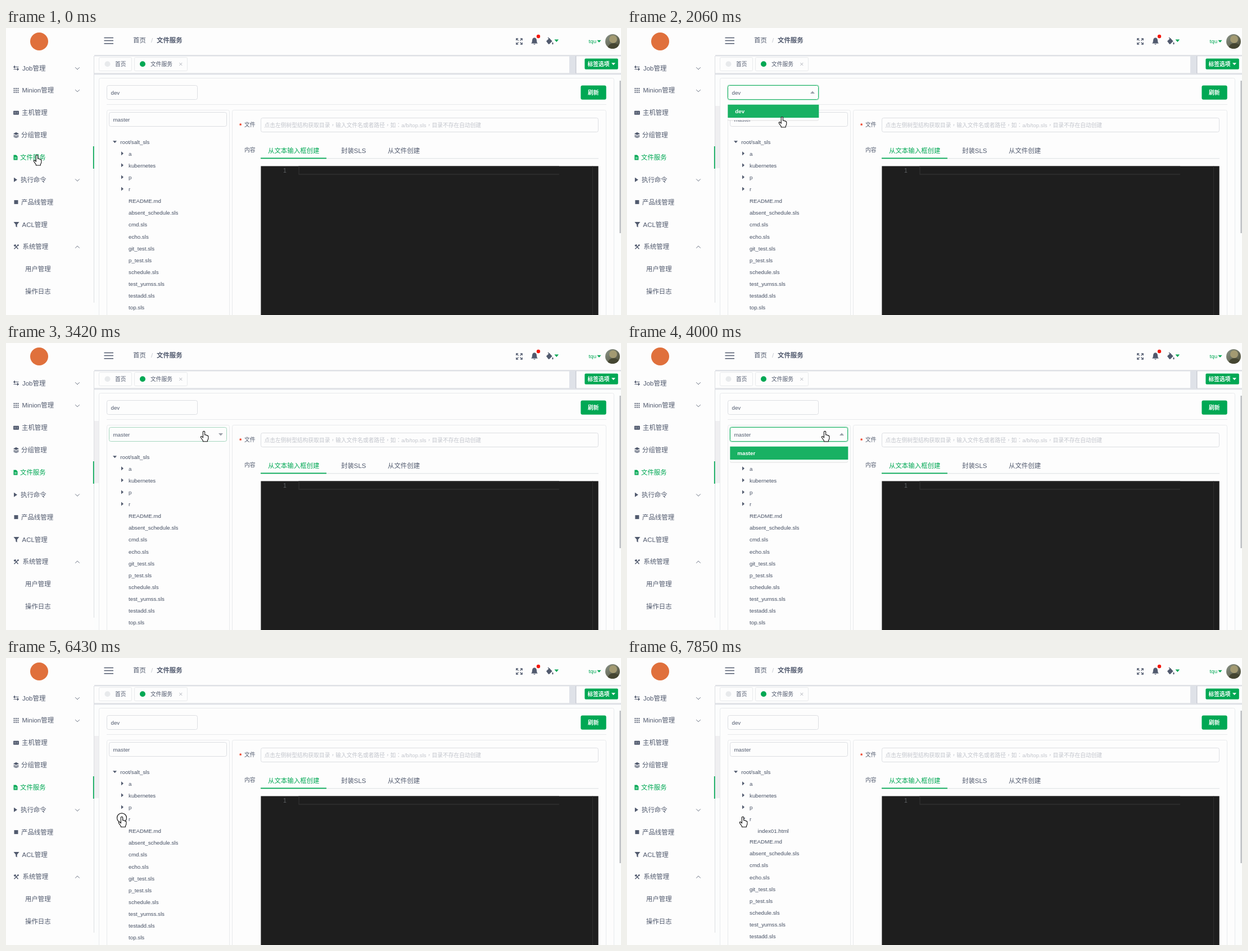
These frames come from a looping animation (1094 px wide and 512 px high, 8 s). An HTML page:

```html
<!DOCTYPE html>
<html lang="zh">
<head>
<meta charset="utf-8">
<title>文件服务</title>
<style>
html, body { margin: 0; width: 100%; height: 100%; overflow: hidden; background: #fff; }
svg { display: block; width: 1094px; height: 512px; }
text { font-family: "Liberation Sans", "Noto Sans CJK SC", "Noto Sans CJK", sans-serif; white-space: pre; }
.hint { font-family: "Liberation Sans", "Noto Sans CJK TC", "Noto Sans CJK", sans-serif; }
</style>
</head>
<body>
<svg id="stage" viewBox="0 0 1094 512" xmlns="http://www.w3.org/2000/svg"></svg>
<script>
const LOOP = 8000;
const GREEN = '#00a854', INK = '#515a6e', LINE = '#dcdee2', PALE = '#e8eaec', PAPER = '#fdfdfd';
const SMALL = 9.75, MEDIUM = 11.45;
const ROW = 21.13;

// --- drawing helpers -------------------------------------------------
const attrs = o => Object.entries(o).map(([k, v]) => ` ${k}="${v}"`).join('');
const tag = (name, o, inner = '') => `<${name}${attrs(o)}>${inner}</${name}>`;
const rect = (x, y, x2, y2, fill, o = {}) =>
  tag('rect', { x, y, width: x2 - x, height: y2 - y, fill, ...o });
const frame = (x, y, x2, y2, stroke = LINE, o = {}) =>
  rect(x + .5, y + .5, x2 - .5, y2 - .5, PAPER, { stroke, rx: 3, ...o });
const path = (d, fill = INK, o = {}) => tag('path', { d, fill, ...o });
const stroke = (d, color = INK, width = 1, o = {}) =>
  path(d, 'none', { stroke: color, 'stroke-width': width, ...o });
const circle = (cx, cy, r, fill, o = {}) => tag('circle', { cx, cy, r, fill, ...o });
// y is the middle of the line
const text = (x, y, s, size = SMALL, fill = INK, o = {}) =>
  tag('text', { x, y: y + size * .36, 'font-size': size, fill, ...o }, s);
const boldText = (x, y, s, size, fill) => text(x, y, s, size, fill, { 'font-weight': 700 });
const group = (id, inner = '', o = {}) => tag('g', { id, ...o }, inner);
const caretDown = (x, y, fill, r = 3.6) => path(`M${x - r} ${y - r / 2}h${2 * r}l${-r} ${r * 1.15}z`, fill);
const caretRight = (x, y) => path(`M${x - 2} ${y - 3.5}v7l4 -3.5z`);
const chevron = (x, y, up) => stroke(`M${x - 3.8} ${y + up * 1.8}l3.8 ${-up * 3.8}l3.8 ${up * 3.8}`, '#6b7383');

// --- sidebar ---------------------------------------------------------
const icons = [
  y => stroke(`M13.5 ${y - 2}h9M13.5 ${y + 2}h9`, INK, 1.2) +
       path(`M16 ${y - 5}v6l-3 -3zM20 ${y - 1}v6l3 -3z`),
  y => [-1, 0, 1].map(i => [-1, 0, 1].map(j =>
       rect(17 + i * 3.4, y - 1 + j * 3.4, 19 + i * 3.4, y + 1 + j * 3.4, INK)).join('')).join(''),
  y => rect(13, y - 3.5, 23, y + 3.5, INK, { rx: 1 }) +
       stroke(`M15 ${y - 1.5}v3M17.5 ${y - 1.5}v3M20.5 ${y - 1.5}v3`, '#c5c8ce', .8),
  y => path(`M18 ${y - 5}l5 2.5l-5 2.5l-5 -2.5z`) +
       stroke(`M13.5 ${y}l4.5 2.2l4.5 -2.2M13.5 ${y + 2.3}l4.5 2.2l4.5 -2.2`, INK, 1.2),
  y => path(`M13.5 ${y - 4.5}h4.5l2.5 2.5v6.5h-7z`, GREEN) +
       stroke(`M15 ${y}h4M15 ${y + 2}h4`, '#fff', .8),
  y => path(`M14 ${y - 4}v8l6 -4z`),
  y => rect(14.5, y - 3.5, 21.5, y + 3.5, INK),
  y => path(`M13.5 ${y - 4.5}h10l-3.8 4.8v4.7l-2.4 -1.5v-3.2z`),
  y => stroke(`M15.5 ${y - 3}l6 7M22 ${y - 3.5}l-7.5 7.5`, INK, 1.4) +
       path(`M13.5 ${y - 2.5}l3 -2l1.6 1.6l-3 2.6zM19.8 ${y - 3.6}l2.4 -.8l.8 2.4l-2 .8z`)
];
const menu = [
  ['Job管理', 29, -1], ['Minion管理', 28.5, -1], ['主机管理', 28], ['分组管理', 27], ['文件服务', 25],
  ['执行命令', 26, -1], ['产品线管理', 27], ['ACL管理', 28.5], ['系统管理', 29.5, 1],
  ['用户管理', 34], ['操作日志', 34]
];

function sidebar() {
  const rows = menu.map(([label, x, arrow], i) => {
    const y = 71.5 + i * 39.85;
    return (icons[i] ? icons[i](y) : '') +
      text(x, y, label, MEDIUM, i === 4 ? GREEN : INK) +
      (arrow ? chevron(127, y + .5, arrow) : '');
  }).join('');
  return rect(156, 50, 157, 490, LINE) + rect(154.9, 211, 156.6, 251, GREEN) +
    circle(59, 24, 16, '#e0703c') + rows;
}

// --- header and tab bar ------------------------------------------------
function header() {
  const corners = [[1, 1], [-1, 1], [1, -1], [-1, -1]].map(([a, b]) =>
    `M${913 - a * 5.2} ${24 - b * 1.8}v${-b * 3.4}h${a * 3.4}M${913 - a * 5} ${24 - b * 5}l${a * 3.6} ${b * 3.6}`).join('');
  return stroke('M174.5 17.5h16.5M174.5 22.5h16.5M174.5 27.7h16.5', INK, 1.6) +
    text(226, 22, '首页', MEDIUM) + text(258, 22, '/', MEDIUM, '#c5c8ce') +
    boldText(268, 22, '文件服务', MEDIUM, INK) +
    stroke(corners, INK, 1.3) +
    path('M934 27.5q2 -1.5 2 -5q0 -4.8 4 -5.3q4 .5 4 5.3q0 3.5 2 5zM938 28.5h4q-2 2.6 -4 0z') +
    circle(947, 15, 3.2, '#f5180c') +
    path('M961 23.5l5.5 -5.5l5.2 5.5l-5 5q-1 .8 -2 0zM972.5 25q2.4 3.6 0 4.4q-2.4 -.8 0 -4.4z') +
    stroke('M964 17l3 2.5', INK, 1.2) +
    caretDown(979.3, 22.5, GREEN, 3.8) +
    text(1036.5, 23.5, 'tqu', SMALL, GREEN) + caretDown(1055, 23.5, GREEN) +
    tag('g', { 'clip-path': 'url(#face)' },
      rect(1066, 11, 1092, 37, 'url(#photo)') +
      tag('ellipse', { cx: 1080, cy: 20, rx: 7, ry: 7, fill: '#a39a72' }) +
      tag('ellipse', { cx: 1081, cy: 35, rx: 10, ry: 8, fill: '#454632' }));
}

function tabBar() {
  return rect(157, 48, 1094, 50.5, '#dfe1e6') + rect(157, 80.3, 1094, 83.3, '#dfe1e6') +
    frame(165, 52, 224, 77, PALE, { rx: 2 }) + circle(180.5, 64.3, 5, PALE) + text(194, 64.5, '首页') +
    frame(228, 52, 323, 77, PALE, { rx: 2 }) + circle(243, 64.3, 5, GREEN) + text(257, 64.5, '文件服务') +
    stroke('M308.3 62l5 5m0 -5l-5 5', '#a0a4ad', .8) +
    rect(1002, 50, 1014, 81, '#dfe2e8') + rect(1013, 50, 1014.5, 81, '#c9ccd4') +
    rect(1029.4, 54.4, 1088.8, 73.8, GREEN, { rx: 2 }) +
    boldText(1034.5, 64, '标签选项', SMALL, '#fff') + caretDown(1080.5, 64, '#fff', 3.5);
}

// --- page body ---------------------------------------------------------
function panels() {
  return rect(157, 83, 1094, 512, '#fcfdfd') +
    rect(157, 139, 165, 250, '#efeff1', { id: 'strip' }) +
    frame(165, 89, 1082, 530, PALE) + rect(1091.3, 94, 1094, 366, '#c1c3c7') +
    rect(1022.4, 102.4, 1067.7, 127.8, GREEN, { rx: 3 }) +
    boldText(1035, 115, '刷新', SMALL, '#fff') +
    rect(179, 136, 1068, 137, PALE) +
    frame(179, 146, 398, 530, PALE) + frame(402, 146, 1068, 530, PALE);
}

function form() {
  return boldText(415, 174.5, '*', 11, '#ed3014') + text(424, 172.5, '文件') +
    frame(453, 160, 1054, 186) +
    text(459.5, 173, '点击左侧树型结构获取目录，输入文件名或者路径，如：a/b/top.sls，目录不存在自动创建',
      SMALL, '#c2c5cc', { class: 'hint', lang: 'zh-Hant' }) +
    text(424, 217, '内容') +
    text(466, 219, '从文本输入框创建', MEDIUM, GREEN) + text(596, 219, '封装SLS', MEDIUM) +
    text(679, 219, '从文件创建', MEDIUM) +
    rect(453, 232.3, 1054, 233.3, LINE) + rect(453, 231.5, 570, 233.3, GREEN) +
    rect(453.4, 246.4, 1053.7, 512, '#1e1e1e') +
    stroke('M984 247h-463v14h463', '#303030', 1.3) + rect(1043, 246.4, 1044, 512, '#2f2f2f') +
    text(493, 254.5, '1', 10.5, '#5f6265', { 'font-family': 'Liberation Mono, monospace' });
}

const folders = ['a', 'kubernetes', 'p', 'r'];
const files = ['README.md', 'absent_schedule.sls', 'cmd.sls', 'echo.sls', 'git_test.sls', 'p_test.sls',
  'schedule.sls', 'test_yumss.sls', 'testadd.sls', 'top.sls'];
const rowY = i => 203 + ROW * i;
const treeText = (x, i, s) => text(x, rowY(i), s, SMALL, '#465064');

function tree() {
  return caretDown(193.5, 203, INK, 3.5) + treeText(203.3, 0, 'root/salt_sls') +
    folders.map((name, i) => group('folder' + i, caretRight(207, rowY(i + 1) - .5)) +
      treeText(218, i + 1, name)).join('') +
    tag('g', { 'clip-path': 'url(#childClip)' }, treeText(232.5, 5, 'index01.html')) +
    group('files', files.map((name, i) => treeText(218, i + 5, name)).join(''));
}

// --- selects -------------------------------------------------------------
const selects = [
  { id: 'dev', x: 179, y: 102, x2: 341 },
  { id: 'master', x: 183, y: 150, x2: 393 }
];
const select = ({ id, x, y, x2 }) =>
  rect(x - .5, y - .5, x2 + .5, y + 26.5, 'none', { id: id + 'Glow', rx: 4, stroke: GREEN, 'stroke-width': 1.6, 'stroke-opacity': .2 }) +
  frame(x, y, x2, y + 26, LINE, { id: id + 'Box' }) + text(x + 7.5, y + 13, id) +
  group(id + 'Caret', caretDown(0, 0, '#9a9fa8', 4));
const dropdown = ({ id, x, y, x2 }) => group(id + 'Drop',
  rect(x, 1, x2, 34, '#000', { rx: 3, opacity: .12 }) +
  rect(x, 0, x2, 33, PAPER, { rx: 3 }) + rect(x + .3, 5.2, x2 + .3, 28.6, '#19b163') +
  boldText(x + 13.3, 16.8, id, SMALL, '#fff'));

const HAND = 'M-1.6 1.6Q-1.6 .4 0 .4Q1.6 .4 1.6 1.6V7Q3.9 6.1 4.2 7.7Q6.1 7 6.4 8.6Q7.9 8.2 7.9 9.8V13Q7.8 15 6.4 16.8V18.7H-1.6V17.2L-5 12.3Q-6.2 10.3 -5.1 9.7Q-4 9.2 -2.8 10.5L-1.6 12Z';
const ARROW = 'M.4 .6V12.2L3 9.8L5 14.4L6.9 13.5L4.9 9.1H8.5Z';

const $ = id => document.getElementById(id);
$('stage').innerHTML =
  `<defs>
    <clipPath id="face">${circle(1079, 24, 13, '#000')}</clipPath>
    <clipPath id="childClip"><rect id="childArea" x="200" y="298" width="190" height="0"/></clipPath>
    <linearGradient id="photo" x2="1" y2="1"><stop stop-color="#8b9488"/><stop offset="1" stop-color="#4b4a34"/></linearGradient>
  </defs>` +
  rect(0, 0, 1094, 512, PAPER) + panels() + sidebar() + header() + tabBar() + form() + tree() +
  selects.map(select).join('') + selects.map(dropdown).join('') +
  circle(0, 0, 8.5, 'none', { id: 'ring', stroke: '#1c1c1c', 'stroke-width': 1.2 }) +
  group('cursor',
    path(HAND, '#fff', { id: 'hand', stroke: '#111', 'stroke-width': 1.1, 'stroke-linejoin': 'round' }) +
    path(ARROW, '#fff', { id: 'arrow', stroke: '#111', 'stroke-width': 1 }));

// --- motion ----------------------------------------------------------------
const ticks = [0, 560, 690, 820, 950, 1070, 1190, 1340, 1490,
  1610, 1750, 1900, 2040, 2180, 2320, 2470, 2610, 2760, 2910, 3040, 3160, 3290, 3420,
  3700, 3850, 4000, 4680, 4820, 4960, 5100, 5240, 5370, 5490, 5640,
  5790, 5920, 6050, 6170, 6300, 6430, 6570, 6690, 6840, 6980, 7110, 7710, 7850];
const clicks = [1610, 2610, 3700, 4680, 6430, 7710];
// time, x, y of the pointer tip
const route = [[0, 55, 226.3], [440, 55, 226.3], [1070, 261, 120.8], [1490, 274, 120.8], [1850, 274, 120.8],
  [2180, 277, 182], [2610, 274, 120.8], [2760, 274, 120.8], [3090, 315, 182], [3420, 352, 157],
  [4680, 352, 157], [5370, 286, 235.5], [5640, 269, 313], [6300, 206, 282.8], [LOOP, 206, 282.8]];

const clamp = v => Math.max(0, Math.min(1, v));
const smooth = v => v * v * (3 - 2 * v);
const show = (id, on) => $(id).setAttribute('visibility', on ? 'visible' : 'hidden');
const set = (id, name, value) => $(id).setAttribute(name, value);

function pointer(t) {
  const i = route.findIndex(p => p[0] > t);
  const [t0, x0, y0] = route[i - 1], [t1, x1, y1] = route[i];
  const k = smooth((t - t0) / (t1 - t0));
  return [x0 + (x1 - x0) * k, y0 + (y1 - y0) * k];
}

function drawSelect({ id, x, y, x2 }, { hover, open, focus, closing }) {
  const expanded = open > 0 && !closing;
  set(id + 'Box', 'stroke', expanded ? '#19b163' : focus ? '#5cc492' : hover ? '#a5d6be' : LINE);
  show(id + 'Glow', expanded);
  show(id + 'Caret', hover || open > 0);
  set(id + 'Caret', 'transform', `translate(${x2 - 11} ${y + 13}) scale(1 ${expanded ? -1 : 1})`);
  show(id + 'Drop', open > 0);
  set(id + 'Drop', 'opacity', open);
  set(id + 'Drop', 'transform', `translate(0 ${y + 29.5}) scale(1 ${.8 + .2 * open})`);
}

function draw(now) {
  const t = ticks.filter(v => v <= now).pop();
  const [x, y] = pointer(t);
  const inside = s => x >= s.x && x <= s.x2 && y >= s.y && y <= s.y + 26;
  const [dev, master] = selects;
  const devOpen = t < 2400 ? clamp((t - 1650) / 250) : clamp((2820 - t) / 150);
  const masterOpen = t < 4400 ? clamp((t - 3750) / 250) : clamp((4950 - t) / 220);
  const overDev = inside(dev), overMaster = inside(master) && devOpen === 0;

  drawSelect(dev, { hover: overDev, open: devOpen, focus: t >= 1610 && t < 2910, closing: t >= 2760 });
  drawSelect(master, { hover: overMaster, open: masterOpen, focus: t >= 3700 && t < 5490, closing: t >= 4820 });
  show('strip', t >= 690);

  const shift = t < 7850 ? ROW * clamp((t - 6750) / 300) : 19;
  set('files', 'transform', `translate(0 ${shift})`);
  set('childArea', 'height', shift);
  set('folder3', 'transform', `rotate(${t >= 6690 ? 90 : 0} 207 ${rowY(4) - .5})`);

  const overTree = x < 278 && y > 212;
  const hand = x < 157 || overDev || overMaster || devOpen > 0 || overTree;
  show('hand', hand);
  show('arrow', !hand);
  set('cursor', 'transform', `translate(${x} ${y})`);
  show('ring', clicks.includes(t));
  set('ring', 'transform', `translate(${x} ${y + 2.5})`);
}

let start;
function loop(now) {
  start ??= now;
  draw((now - start) % LOOP);
  requestAnimationFrame(loop);
}
draw(0);
requestAnimationFrame(loop);
</script>
</body>
</html>
```
